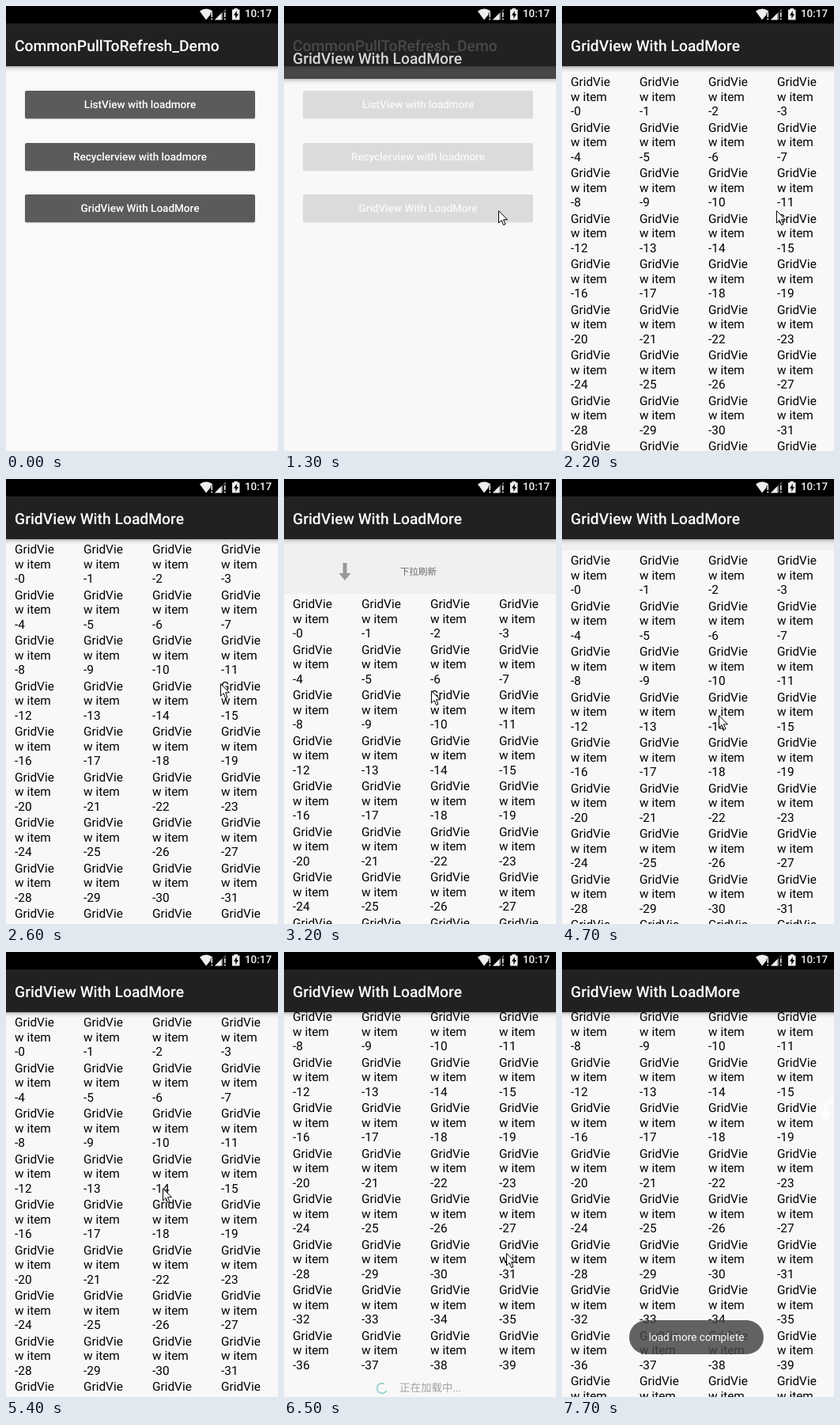
An HTML page that plays this animation: 344 px wide and 562 px high, repeating every 8.3 s.

```html
<!DOCTYPE html>
<html lang="en">
<head>
<meta charset="utf-8">
<title>Pull to refresh</title>
<style>
  html, body { margin: 0; width: 100%; height: 100%; overflow: hidden; background: #f9f9f9; }
  body { font-family: Roboto, "Noto Sans CJK SC", "Noto Sans CJK", sans-serif; text-rendering: geometricPrecision; }
  #stage { position: relative; width: 344px; height: 562px; overflow: hidden; background: #212121; }
  #stage div, #stage svg { position: absolute; }
  .screen { left: 0; top: 22px; width: 344px; height: 540px; background: #f9f9f9; }
  .bar { left: 0; top: 0; width: 344px; height: 54px; background: #212121; }
  .bar span { position: absolute; left: 11px; top: 2px; color: #fff; font: 500 19.3px/54px Roboto, sans-serif; white-space: nowrap; }
  .shade { left: 0; top: 54px; width: 344px; height: 7px; background: linear-gradient(rgba(0,0,0,.28), rgba(0,0,0,.08) 45%, transparent); }
  .btn { left: 24px; width: 291px; height: 35px; border-radius: 2px; background: #5b5b5b; box-shadow: 0 1px 1px rgba(0,0,0,.25);
    color: #fff; font: 500 13.5px/36px Roboto, sans-serif; text-align: center; }
  #view { left: 0; top: 54px; width: 344px; height: 486px; overflow: hidden; background: #f8f8f8; }
  #head { left: 0; top: -66px; width: 344px; height: 66px; background: #f0f0f0; }
  #headText { left: 0; top: 29px; width: 340px; color: #666; font-size: 11.5px; line-height: 18px; text-align: center; }
  #list { left: 0; top: 0; width: 344px; height: 700px; background: #f8f8f8; }
  .cell { color: #000; font-size: 15.4px; line-height: 18.4px; white-space: nowrap; }
  #foot { left: 0; top: 580px; width: 344px; height: 32px; }
  #foot span { position: absolute; left: 146px; top: 8px; color: #a0a0a0; font-size: 13.5px; line-height: 18px; white-space: nowrap; }
  #toast { left: 85px; top: 465px; width: 170px; height: 43px; border-radius: 22px; background: rgba(70,70,70,.84);
    color: #fff; font-size: 13.6px; line-height: 45px; text-align: center; white-space: nowrap; }
  #status { left: 0; top: 0; width: 344px; height: 22px; background: #000; }
  #clock { left: 302px; top: 0; color: #f0f0f0; font: 500 13.4px/22px Roboto, sans-serif; }
  .spin circle { fill: none; stroke: #80cbc4; stroke-width: 1.4; }
</style>
</head>
<body>
<div id="stage">
  <div class="screen">
    <div class="bar"><span>CommonPullToRefresh_Demo</span></div>
    <div class="shade"></div>
    <div class="btn" style="top:85px">ListView with loadmore</div>
    <div class="btn" style="top:151px">Recyclerview with loadmore</div>
    <div class="btn" id="gridBtn" style="top:216px">GridView With LoadMore</div>
  </div>

  <div class="screen" id="grid">
    <div id="view">
      <div id="list">
        <div id="head">
          <svg id="arrow" style="left:68px;top:25px" width="18" height="26" viewBox="-9 -13 18 26">
            <path d="M-2.5-11h5V2h5L0 11-7.5 2h5z" fill="#999"/>
          </svg>
          <svg class="spin" id="headSpin" style="left:67px;top:28px" width="20" height="20" viewBox="-10 -10 20 20">
            <circle r="7" pathLength="100"/>
          </svg>
          <div id="headText"></div>
        </div>
        <div id="cells"></div>
        <div id="foot">
          <svg class="spin" id="footSpin" style="left:113.500px;top:6.500px" width="20" height="20" viewBox="-10 -10 20 20">
            <circle r="6.3" pathLength="100"/>
          </svg>
          <span>正在加载中...</span>
        </div>
      </div>
    </div>
    <div class="bar"><span>GridView With LoadMore</span></div>
    <div class="shade"></div>
  </div>

  <div id="toast">load more complete</div>

  <div id="status">
    <svg width="344" height="22" fill="#eee">
      <path d="M245 6.5Q253 .5 261.5 6.5L258.500 9V11L253 17.5Z"/>
      <path d="M259.500 8h1.600v6h-1.600zM259.500 15.5h1.600v2h-1.600z"/>
      <path d="M264 17.5L278 3.5V7H274.500V17.5Z" fill="#666"/>
      <path d="M264 17.5L272.500 9V17.5Z"/>
      <path d="M276 8h1.600v6h-1.600zM276 15.5h1.600v2h-1.600z"/>
      <path d="M286 4.5h2.5V3h4.500v1.500h2.500v13h-9.500z"/>
      <path d="M291.800 6L288 11.800h2.300v4.200l3.700-6h-2.200z" fill="#000"/>
    </svg>
    <div id="clock">10:17</div>
  </div>

  <svg id="cursor" style="left:0;top:0" width="13" height="20">
    <path d="M.5.7V16l3.600-3.400 2.500 6 2.400-1-2.500-5.800h5z" fill="#fff" stroke="#000"/>
  </svg>
  <svg id="edge" style="left:324px;top:186px" width="20" height="30" fill="#fff">
    <path d="M10 13Q8 3 17 2.500Q20 2.500 22 5" fill="none" stroke="#fff" stroke-width="3.500"/>
    <path d="M2 16l4 1 2-5 3 4 5-1-3 5 2 5-5-2-3 4-1-5-4-1 2-2z"/>
  </svg>
</div>

<script>
const LOOP = 8300, STEP = 100;
const HEAD = 65, ROW = 57.5, MAX_SCROLL = 122;
const OPEN = 1230, FIRST_DONE = 1850, GRAB = 2900, DROP = 3300, SECOND_DONE = 4440, LOADED = 7000;

// time, x, y of the pointer tip
const PATH = [
  [100, 322, 139], [400, 296, 205], [700, 271, 258], [2600, 271, 258],
  [2800, 212, 180], [GRAB, 190, 150], [DROP, 185, 306], [4400, 185, 306],
  [4700, 198, 298], [5500, 198, 298], [5900, 287, 522], [6400, 281, 380],
  [6700, 281, 380], [6900, 281, 373], [7200, 281, 380], [7300, 281, 380],
  [7600, 329, 212]
];

const $ = id => document.getElementById(id);
const clamp = v => Math.max(0, Math.min(1, v));
const show = (id, on) => { $(id).style.visibility = on ? "inherit" : "hidden"; };

for (let i = 0; i < 44; i++) {
  const cell = document.createElement("div");
  cell.className = "cell";
  cell.style.left = 11 + 87 * (i % 4) + "px";
  cell.style.top = 4.4 + ROW * Math.floor(i / 4) + "px";
  cell.innerHTML = `GridVie<br>w item<br>-${i}`;
  $("cells").append(cell);
}
const extra = [...$("cells").children].slice(40);

// Android's "viscous fluid" scroller curve
function viscous(p) {
  const x = 8 * clamp(p), k = Math.exp(-1);
  if (p >= 1) return 1;
  return x < 1 ? x - (1 - Math.exp(-x)) : k + (1 - k) * (1 - Math.exp(1 - x));
}

function pointer(t) {
  const n = PATH.findIndex(p => p[0] >= t);
  if (n < 0) return PATH[PATH.length - 1].slice(1);
  if (n === 0) return PATH[0].slice(1);
  const a = PATH[n - 1], b = PATH[n], f = (t - a[0]) / (b[0] - a[0]);
  return [a[1] + (b[1] - a[1]) * f, a[2] + (b[2] - a[2]) * f];
}

function pull(t, y) {
  if (t < FIRST_DONE) return HEAD * viscous((t - 1400) / 1000);
  if (t < GRAB) return HEAD * (1 - viscous((t - FIRST_DONE) / 1000));
  if (t < DROP) return (y - 150) / 1.7;
  if (t < SECOND_DONE) return HEAD + 27 * (1 - viscous((t - DROP) / 200));
  return HEAD * (1 - viscous((t - SECOND_DONE) / 1000));
}

function headState(t, off) {
  if (t < FIRST_DONE) return "加载中...";
  if (t < GRAB) return "更新完成";
  if (t < 3500) return off > 78 ? "释放刷新" : "下拉刷新";
  return t < SECOND_DONE ? "加载中..." : "更新完成";
}

function spin(id, ms) {
  const u = Math.max(0, ms) / 1333, p = u % 1;
  const ease = v => { v = clamp(v); return v * v * (3 - 2 * v); };
  const from = 0.75 * ease(2 * p - 1), to = 0.75 * ease(2 * p);
  const len = Math.max(2, 100 * (to - from));
  const circle = $(id).firstElementChild;
  circle.setAttribute("stroke-dasharray", `${len} ${100 - len}`);
  circle.setAttribute("transform", `rotate(${360 * (from + 0.25 * p + 0.4 * u) - 90})`);
}

function draw(t) {
  const [x, y] = pointer(t);
  $("cursor").style.transform = `translate(${Math.round(x)}px,${Math.round(y)}px)`;
  show("cursor", t >= 100 && t < 7700);
  show("edge", t >= 7700);
  $("gridBtn").style.background = t >= 1000 && t < 1300 ? "#6b6b6b" : "";

  const enter = t - OPEN;
  $("grid").style.opacity = 1 - (1 - clamp(enter / 200)) ** 4;
  $("grid").style.transform = `translateY(${Math.round(48 * (1 - clamp(enter / 350)) ** 5)}px)`;
  show("grid", enter > 0);

  const off = pull(t, y);
  const scroll = t < 5900 ? 0 : t < 6400 ? Math.min(MAX_SCROLL, (522 - y) * 0.95) : MAX_SCROLL;
  $("list").style.transform = `translateY(${Math.round(off - scroll)}px)`;
  show("cells", t >= FIRST_DONE);
  show("foot", t >= 5500 && t < LOADED);
  extra.forEach(c => { c.style.visibility = t >= LOADED ? "inherit" : "hidden"; });

  const label = headState(t, off), busy = label === "加载中...";
  if ($("headText").textContent !== label) $("headText").textContent = label;
  show("head", off > 0.5);
  show("headSpin", busy && (t < GRAB || t >= 3580));
  show("arrow", t >= GRAB && t < 3500);
  $("arrow").style.transform = `rotate(${-180 * clamp((off - 78) / 8)}deg)`;
  spin("headSpin", t < GRAB ? t - 1400 : t - 3580);
  spin("footSpin", t - 5833);

  $("toast").style.opacity = clamp((t - 7000) / 300);
}

const start = performance.now();
function tick() {
  const t = (performance.now() - start) % LOOP;
  draw(Math.min(7700, Math.floor(t / STEP) * STEP));
  requestAnimationFrame(tick);
}
tick();
</script>
</body>
</html>
```
